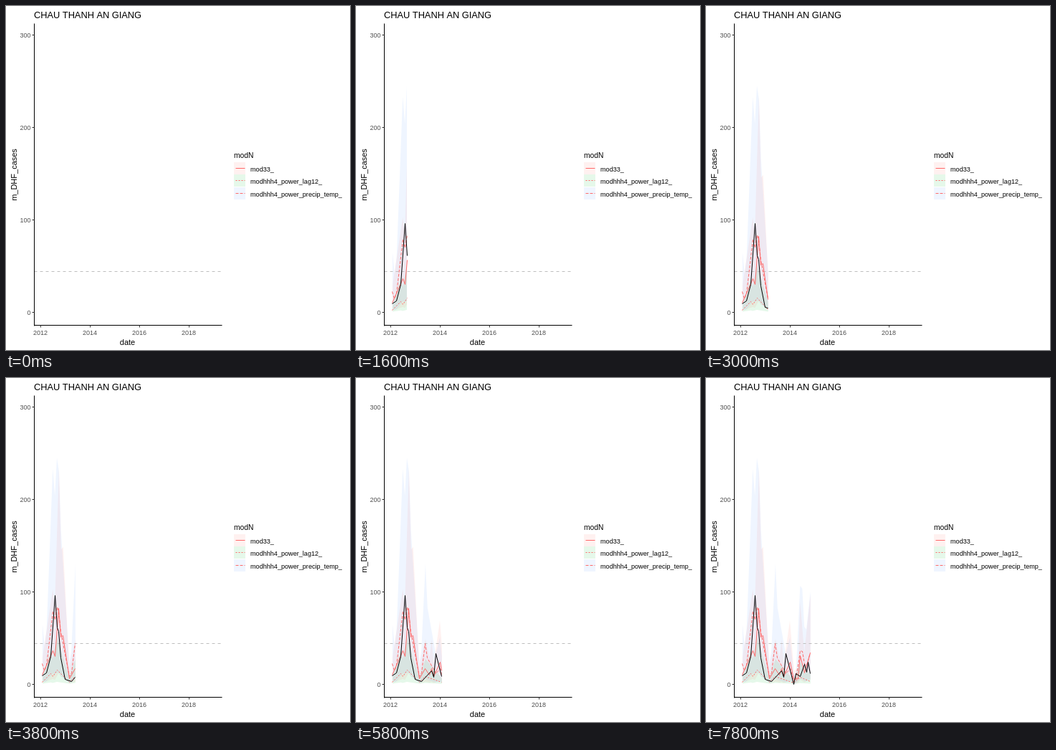
Write an HTML page with a canvas that moves like this. It is 480 by 480 pixels and loops after 8 s.

```html
<!DOCTYPE html>
<html lang="en">
<head>
<meta charset="utf-8">
<title>Monthly DHF cases</title>
<style>
  html, body { margin: 0; height: 100%; overflow: hidden; background: #fff; }
  canvas { display: block; width: 100vw; height: 100vh; }
</style>
</head>
<body>
<canvas id="chart" width="480" height="480"></canvas>
<script>
const ctx = document.getElementById('chart').getContext('2d');

const STEP_MS = 200, STEPS = 40;
const STEPS_PER_MONTH = 99 / 83;
const RED = '#ff6a6a';
const LOW_RATIO = 0.15;

// Turning points as [months since February 2012, cases]; straight in between
const observed = [[0, 9], [2, 12], [4, 30], [6, 96], [7, 61], [8, 57], [9, 28], [11, 5],
  [14, 3], [19, 14], [20, 7], [21, 33], [25, 0], [26, 11], [28, 8], [30, 21], [31, 13],
  [32, 24], [33, 11]];

// Each model's interval spans fixed ratios of its mean
const models = [
  { name: 'mod33_', dash: [], fill: '#f8766d', highRatio: 2.85,
    mean: [[0, 10], [5, 36], [6, 30], [8, 82], [9, 51], [10, 52], [13, 6], [16, 17],
      [18, 10], [19, 17], [20, 8], [23, 24], [25, 5], [27, 6], [28, 31], [30, 12], [33, 34]] },
  { name: 'modhhh4_power_lag12_', dash: [2, 2], fill: '#00ba38', highRatio: 3.4,
    mean: [[0, 2], [4, 11], [5, 8], [7, 15], [13, 2], [16, 8], [25, 1], [28, 7], [33, 3]] },
  { name: 'modhhh4_power_precip_temp_', dash: [4, 2], fill: '#619cff', highRatio: 2.95,
    mean: [[0, 22], [1, 14], [2, 20], [5, 79], [6, 69], [7, 83], [8, 78], [9, 56], [13, 8],
      [14, 12], [16, 44], [17, 28], [21, 11], [23, 17], [25, 3], [26, 5], [28, 36],
      [29, 35], [30, 21], [31, 20], [33, 34]] },
];

const monthX = month => 50.9 + 2.875 * month;
const valueY = value => 427 - 1.29 * value;
const stepOfMonth = month => Math.round(month * STEPS_PER_MONTH);
const toPixel = v => Math.floor(v) + 0.5;

// Fractional month reached at a step; each month lands on a whole step
function reachedMonth(step) {
  let month = 0;
  while (stepOfMonth(month + 1) <= step) month++;
  const from = stepOfMonth(month);
  return month + (step - from) / (stepOfMonth(month + 1) - from);
}

function valueAt(keys, month) {
  const next = Math.max(1, keys.findIndex(([m]) => m >= month));
  const [m0, v0] = keys[next - 1], [m1, v1] = keys[next];
  return v0 + (v1 - v0) * (month - m0) / (m1 - m0);
}

function reveal(keys, reached, ratio = 1) {
  const months = keys.map(([m]) => m).filter(m => m < reached);
  return [...months, reached].map(m => [monthX(m), valueY(ratio * valueAt(keys, m))]);
}

function trace(points) {
  ctx.beginPath();
  points.forEach(([x, y]) => ctx.lineTo(x, y));
}

function line(points, color, dash = []) {
  trace(points.map(([x, y]) => [toPixel(x), toPixel(y)]));
  ctx.strokeStyle = color;
  ctx.lineWidth = 1;
  ctx.setLineDash(dash);
  ctx.stroke();
}

function tint(color, paint) {
  ctx.fillStyle = color;
  ctx.globalAlpha = 0.1;
  paint();
  ctx.globalAlpha = 1;
}

function ribbon({ mean, fill, highRatio }, reached) {
  const low = reveal(mean, reached, LOW_RATIO).reverse();
  trace([...reveal(mean, reached, highRatio), ...low]);
  tint(fill, () => ctx.fill());
}

function text(label, x, y, size, align = 'left', color = '#000') {
  ctx.font = `${size}px "Liberation Sans", Arial, sans-serif`;
  ctx.textAlign = align;
  ctx.fillStyle = color;
  ctx.fillText(label, x, y);
}

function drawAxes() {
  line([[39, 24], [39, 446]], '#000');
  line([[39, 445], [301, 445]], '#000');
  for (let v = 0; v <= 300; v += 100) {
    const y = Math.round(valueY(v));
    line([[36, y], [39, y]], '#333');
    text(v, 34.5, y + 4, 9, 'right', '#4d4d4d');
  }
  for (let year = 2012; year <= 2018; year += 2) {
    const x = 48 + 34.5 * (year - 2012);
    line([[x, 445], [x, 448]], '#333');
    text(year, x, 459, 9, 'center', '#4d4d4d');
  }
  text('CHAU THANH AN GIANG', 39, 17, 12.8);
  text('date', 169.5, 473, 11, 'center');
  ctx.save();
  ctx.translate(15, 235.5);
  ctx.rotate(-Math.PI / 2);
  text('m_DHF_cases', 0, 0, 11, 'center');
  ctx.restore();
}

function drawLegend() {
  text('modN', 318, 212, 10.3);
  models.forEach(({ name, dash, fill }, i) => {
    const y = Math.round(218 + 17.28 * i);
    tint(fill, () => ctx.fillRect(318, y, 16, 17));
    line([[320, y + 8], [333, y + 8]], RED, dash);
    text(name, 341, y + 13, 9.1);
  });
}

function drawData(step) {
  const reached = reachedMonth(step);
  if (step) models.forEach(model => ribbon(model, reached));
  line([[39, 370], [301, 370]], '#bebebe', [4, 4]);
  if (!step) return;
  models.forEach(({ mean, dash }) => line(reveal(mean, reached), RED, dash));
  line(reveal(observed, reached), '#000');
}

function draw(now) {
  const step = Math.floor(now / STEP_MS) % STEPS;
  ctx.fillStyle = '#fff';
  ctx.fillRect(0, 0, 480, 480);
  drawData(step);
  drawAxes();
  drawLegend();
  requestAnimationFrame(draw);
}

draw(0);
</script>
</body>
</html>
```
